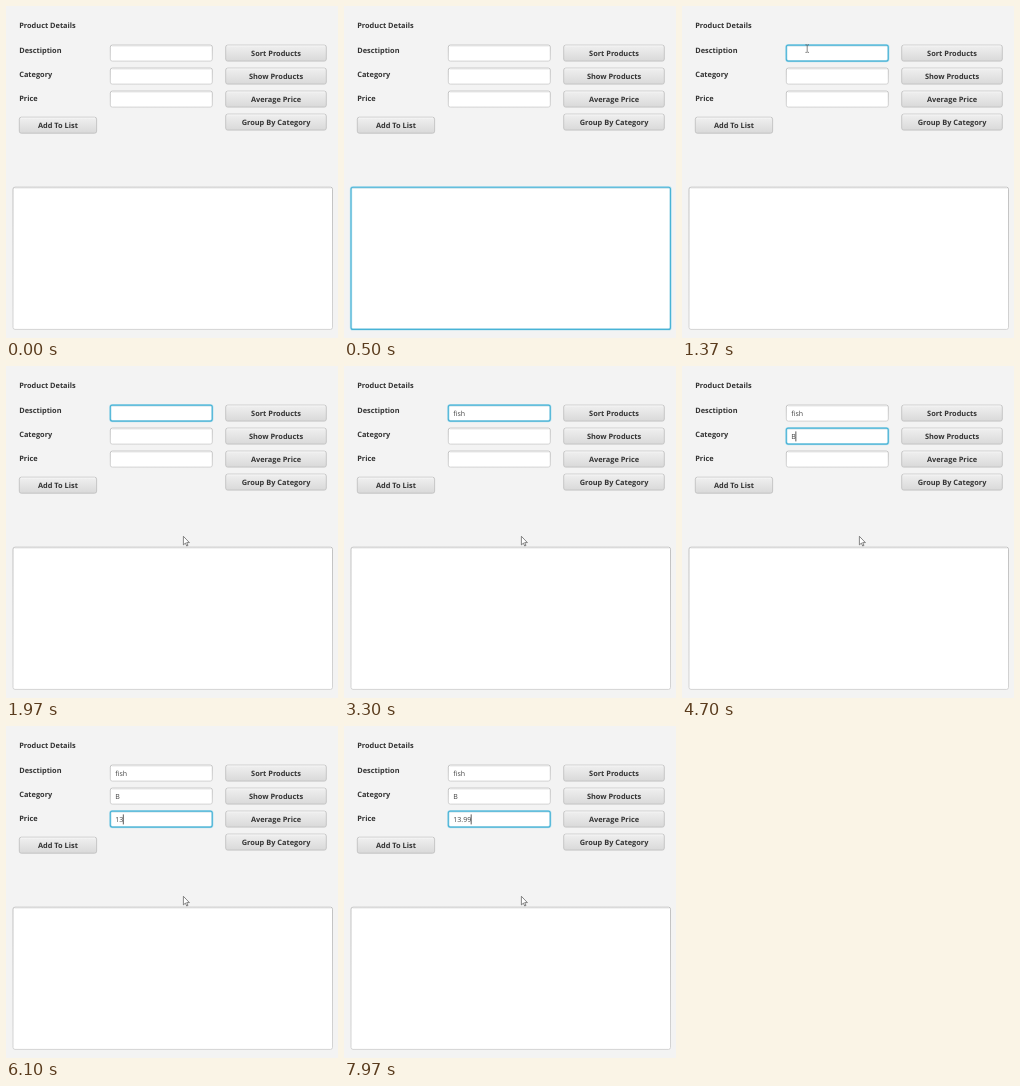
An HTML page that plays this animation: 332 by 332 pixels, repeating every 8000 ms.

```html
<!DOCTYPE html>
<html lang="en">
<head>
<meta charset="utf-8">
<title>Product form</title>
<style>
  html, body { margin: 0; width: 100%; height: 100%; overflow: hidden; background: #f3f3f3; }
  svg { display: block; width: 100vw; height: 100vh; }
  text { font: 7px "Open Sans", "Noto Sans", sans-serif; fill: #444; text-rendering: geometricPrecision; }
  .bold { font-weight: 700; font-size: 7.4px; fill: #333; }
  .mid { text-anchor: middle; }
  .box { fill: #fff; stroke: url(#edge); stroke-width: .8; }
  .button { fill: url(#face); stroke: #bcbcbc; stroke-width: .8; }
  .glow { fill: none; stroke: #bfe3ef; stroke-width: 2.4; }
  .ring { fill: none; stroke: #48b3d6; stroke-width: 1.1; }
  .caret { stroke: #333; stroke-width: .8; }
  .arrow { fill: #fff; stroke: #555; stroke-width: .7; stroke-linejoin: round; }
  .beam { fill: none; stroke: #555; stroke-width: .7; }
</style>
</head>
<body>
<svg viewBox="0 0 332 332">
  <defs>
    <linearGradient id="face" x2="0" y2="1">
      <stop stop-color="#f0f0f0"/><stop offset="1" stop-color="#d9d9d9"/>
    </linearGradient>
    <linearGradient id="edge" x2="0" y2="1">
      <stop stop-color="#b4b4b4"/><stop offset="1" stop-color="#cacaca"/>
    </linearGradient>
  </defs>
</svg>
<script>
const LOOP = 8000, TICK = 200 / 3;
const svg = document.querySelector('svg');

function add(tag, attrs, parent = svg) {
  const el = document.createElementNS('http://www.w3.org/2000/svg', tag);
  for (const key in attrs) el.setAttribute(key, attrs[key]);
  return parent.appendChild(el);
}
const rect = (cls, x, y, width, height, parent) =>
  add('rect', { class: cls, x, y, width, height, rx: 2 }, parent);
const label = (x, y, str, cls = 'bold') => {
  const el = add('text', { class: cls, x, y });
  el.textContent = str;
  return el;
};
const show = (el, on) => el.setAttribute('visibility', on ? 'visible' : 'hidden');

function button(x, y, w, str) {
  rect('button', x, y, w, 16);
  add('path', { d: `M${x + 1.5} ${y + .8}h${w - 3}`, stroke: '#fafafa', 'stroke-width': .7 });
  label(x + w / 2, y + 10.6, str, 'bold mid');
}
// White box with a soft inner shadow and a focus ring
function panel(x, y, w, h) {
  rect('box', x, y, w, h);
  add('path', { d: `M${x + 1.5} ${y + .9}h${w - 3}`, stroke: '#e6e6e6', 'stroke-width': .9 });
  const focus = add('g', {});
  rect('glow', x, y, w, h, focus);
  rect('ring', x, y, w, h, focus);
  return focus;
}

label(13.2, 22, 'Product Details');
['Desctiption', 'Category', 'Price'].forEach((str, i) => label(13.2, 47 + 24.2 * i, str));
['Sort Products', 'Show Products', 'Average Price', 'Group By Category']
  .forEach((str, i) => button(219.7, 39.1 + 23 * i, 100.6, str));
button(13.3, 111.2, 77.3, 'Add To List');

const list = panel(7, 181.2, 319.5, 142.2);

// focus: [from, to]; keys: [time, text]; caret: visible spans
const fields = [
  { focus: [1370, 3630], keys: [[2370, 'f'], [2570, 'fi'], [2700, 'fis'], [2830, 'fish']],
    caret: [[1430, 1970], [2370, 3300]] },
  { focus: [3630, 5230], keys: [[4700, 'B']],
    caret: [[3630, 4100], [4430, 5170]] },
  { focus: [5230, LOOP], keys: [[6030, '1'], [6100, '13'], [7370, '13.'], [7830, '13.9'], [7970, '13.99']],
    caret: [[5230, 5700], [6030, 6630], [7100, LOOP]] }
];
fields.forEach((f, i) => {
  const y = 39.1 + 23 * i;
  f.ring = panel(104.3, y, 102, 16);
  f.text = label(109.3, y + 10.8, '', 'value');
  f.bar = add('path', { class: 'caret', d: `M0 ${y + 3.3}v10` });
});

const pointer = add('g', {});
const arrow = add('path', { class: 'arrow', d: 'M0 0V8.6L2 6.8L3.3 9.7L4.6 9.1L3.3 6.3H6Z' }, pointer);
const beam = add('path', { class: 'beam', d: 'M-1.8 -3.8H-.5L0 -3.3L.5 -3.8H1.8M0 -3.3V3.3M-1.8 3.8H-.5L0 3.3L.5 3.8H1.8' }, pointer);

const within = (t, [from, to]) => t >= from && t < to;
const mix = (a, b, p) => a + (b - a) * p;
const easeOut = p => 1 - (1 - p) ** 2;

function progress(t, start, steps, first) {
  const n = Math.floor((t - start + 4) / TICK) + first;
  return Math.max(0, Math.min(1, n / steps));
}

function movePointer(t) {
  const a = easeOut(progress(t, 900, 5, 0));
  const b = easeOut(progress(t, 1570, 5, 1));
  const x = mix(mix(252.5, 125.2, a), 177.4, b);
  const y = mix(mix(151.5, 42.6, a), 170.3, b);
  const overField = x > 104 && x < 207 && y > 39 && y < 102 && (y - 39) % 23 < 16.5;
  pointer.setAttribute('transform', `translate(${x} ${y})`);
  const on = t >= 900;
  show(beam, on && overField);
  show(arrow, on && !overField);
}

function draw(t) {
  show(list, within(t, [500, 1370]));
  for (const f of fields) {
    const typed = f.keys.filter(([at]) => t >= at).pop();
    const str = typed ? typed[1] : '';
    if (f.text.textContent !== str) f.text.textContent = str;
    const width = str ? f.text.getComputedTextLength() : 0;
    f.bar.setAttribute('transform', `translate(${109.3 + width} 0)`);
    show(f.ring, within(t, f.focus));
    show(f.bar, f.caret.some(span => within(t, span)));
  }
  movePointer(t);
}

let begin;
function frame(now) {
  begin ??= now;
  draw((now - begin) % LOOP);
  requestAnimationFrame(frame);
}
draw(0);
requestAnimationFrame(frame);
</script>
</body>
</html>
```
